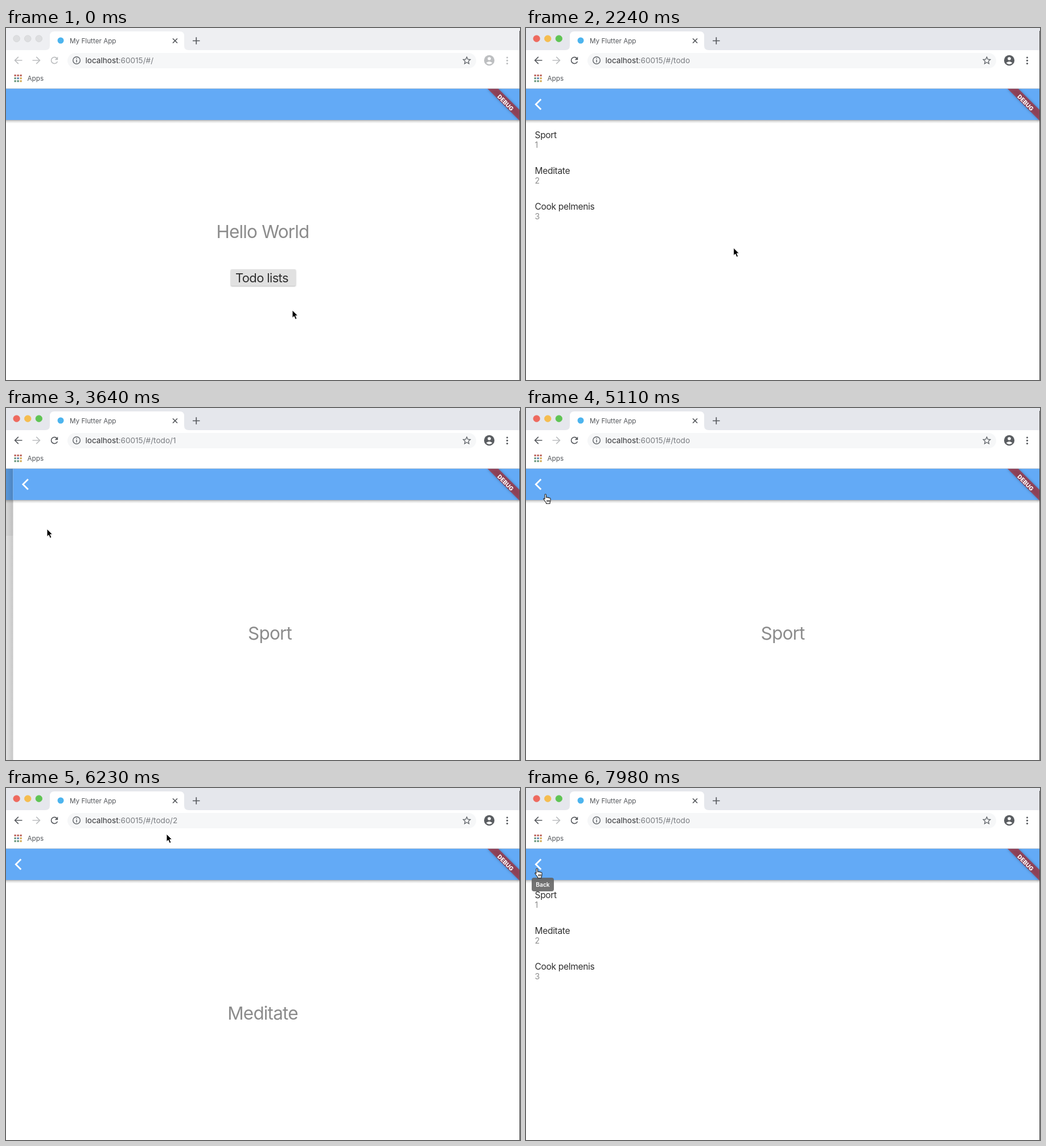
Write an HTML page that moves like this. It is 903 px wide and 620 px high and loops after 8 s.

```html
<!DOCTYPE html>
<html lang="en">
<head>
<meta charset="utf-8">
<title>My Flutter App</title>
<style>
  html, body { margin: 0; height: 100%; overflow: hidden; background: #fff; }
  svg { display: block; width: 100vw; height: 100vh; font-family: Inter, Roboto, sans-serif; }
  .icon { fill: none; stroke: currentColor; stroke-width: 1.7; }
  .headline { font-size: 31.5px; letter-spacing: -.85px; fill: #8c8c8c; text-anchor: middle; }
  .item { font-size: 15.5px; letter-spacing: -.3px; fill: #2e2e2e; }
  .sub { font-size: 14px; fill: #8c8c8c; }
  .chevron { fill: none; stroke: #fff; stroke-width: 2.8; }
  #banner { filter: drop-shadow(0 0 2.5px rgba(0, 0, 0, .45)); }
</style>
</head>
<body>
<svg viewBox="0 0 903 620">
  <defs>
    <linearGradient id="barShade" x2="0" y2="1">
      <stop offset="0" stop-opacity=".3"/>
      <stop offset=".4" stop-opacity=".13"/>
      <stop offset="1" stop-opacity="0"/>
    </linearGradient>
    <linearGradient id="edgeShade">
      <stop offset="0" stop-opacity="0"/>
      <stop offset=".3" stop-opacity=".016"/>
      <stop offset=".6" stop-opacity=".07"/>
      <stop offset="1" stop-opacity=".22"/>
    </linearGradient>
    <clipPath id="viewport"><path d="M0 107H903V620H0Z"/></clipPath>
    <g id="pageBase">
      <path d="M0 107H903V620H0Z" fill="#fff"/>
      <path d="M-45 107H0V620H-45Z" fill="url(#edgeShade)"/>
    </g>
    <g id="bar">
      <path d="M0 162H903V168H0Z" fill="url(#barShade)"/>
      <path d="M0 107H903V162H0Z" fill="#63aaf6"/>
    </g>
    <path id="chevron" class="chevron" d="M26.3 125.5L17.3 134.5L26.3 143.5"/>
  </defs>

  <path id="strip" d="M0 0H903V39H0Z"/>
  <g id="lights"></g>
  <path d="M69 39Q77 39 77 31V14Q77 6 85 6H305Q313 6 313 14V31Q313 39 321 39V106H0V39Z" fill="#fff"/>
  <path d="M0 39H903V106H0Z" fill="#fff"/>
  <path d="M0 106H903V107H0Z" fill="#d4d6d8"/>
  <circle cx="96" cy="22" r="5.5" fill="#4cb4ee"/>
  <text x="112" y="27" font-size="11.7" fill="#54575b">My Flutter App</text>
  <g color="#55585c">
    <path class="icon" stroke-width="1.5" d="M293 18.5L301 26.5M301 18.5L293 26.5"/>
    <path class="icon" d="M328 22.5H340.5M334.3 16.2V28.8"/>
  </g>

  <rect x="108" y="44" width="718" height="27" rx="13.5" fill="#f6f7f8"/>
  <path id="goBack" class="icon" d="M28.5 57H16M21.8 50.8L15.6 57L21.8 63.2"/>
  <path id="goForward" class="icon" d="M46.5 57H59M53.2 50.8L59.4 57L53.2 63.2"/>
  <g id="reload">
    <path class="icon" d="M89.2 53.2A5.6 5.6 0 1 0 90.3 59"/>
    <path d="M91.2 50.5V56.2H85.5Z" fill="currentColor"/>
  </g>
  <g color="#5f6368">
    <circle class="icon" cx="124" cy="57" r="6.3" style="stroke-width:1.4"/>
    <path class="icon" style="stroke-width:1.5" d="M124 56V60.6M124 53V54.6"/>
    <path class="icon" style="stroke-width:1.3" d="M809.5 51L811.3 55.1L815.7 55.5L812.4 58.4L813.4 62.8L809.5 60.5L805.6 62.8L806.6 58.4L803.3 55.5L807.7 55.1Z"/>
  </g>
  <text x="139.5" y="62" font-size="13.6" fill="#797c80"><tspan fill="#303134">localhost</tspan><tspan id="path"></tspan></text>
  <g id="menu" fill="currentColor">
    <circle cx="849" cy="57" r="9.2"/>
    <circle cx="849" cy="54" r="2.8" fill="#fff"/>
    <path d="M843.5 61.6Q849 56.2 854.5 61.6Q849 66.5 843.5 61.6Z" fill="#fff"/>
    <circle cx="880.5" cy="52" r="1.6"/><circle cx="880.5" cy="57.3" r="1.6"/><circle cx="880.5" cy="62.6" r="1.6"/>
  </g>
  <g id="apps"></g>
  <text x="37.5" y="92.5" font-size="11.7" fill="#54575b">Apps</text>

  <g clip-path="url(#viewport)">
    <g id="home">
      <use href="#pageBase"/><use href="#bar"/>
      <text class="headline" x="451" y="369.5">Hello World</text>
      <rect id="button" x="395" y="425" width="114" height="29" rx="2" fill="#e1e1e1"/>
      <text x="403" y="447.5" font-size="22" letter-spacing="-.65" fill="#2e2e2e">Todo lists</text>
    </g>
    <g id="list">
      <use href="#pageBase"/>
      <rect id="highlight" x="1" width="901" height="62" fill-opacity=".045"/>
      <g id="rows"></g>
      <use href="#bar"/><use href="#chevron"/>
    </g>
    <g id="detail">
      <use href="#pageBase"/><use href="#bar"/><use href="#chevron"/>
      <text id="detailTitle" class="headline" x="451" y="408"></text>
    </g>
    <g id="tooltip">
      <rect x="10" y="158" width="39" height="24" rx="4" fill="#616161" fill-opacity=".88"/>
      <text x="29.5" y="174" font-size="10.2" font-weight="600" fill="#fff" text-anchor="middle">Back</text>
    </g>
    <g id="banner">
      <path d="M846 107H865L903 145V164Z" fill="#b71c1c" fill-opacity=".62"/>
      <text transform="translate(877.5 131.5) rotate(45)" y="3.6" font-size="10.2" font-weight="800" fill="#fff" text-anchor="middle">DEBUG</text>
    </g>
  </g>
  <path d="M902 5H903V620H902Z" fill="#4c4c4c"/>

  <g id="cursor" stroke-linejoin="round">
    <path id="arrow" d="M0 0V13.6L3.1 10.8L5.4 16.2L8 15.1L5.7 9.8H9.8Z" stroke="#fff" stroke-width="1"/>
    <path id="hand" transform="translate(-4 0)" fill="#fff" stroke="#222" stroke-width="1.1"
      d="M3 2Q3 .7 4.2 .7T5.5 2V7Q5.6 5.9 6.8 6T8 7.2Q8.3 6.4 9.3 6.6T10.4 7.8Q11 7.2 12 7.6T13 9V12Q13 14 12 15.5V17.5H5.5V16Q3.5 13.5 2.5 12Q.5 9.5 .8 8.8Q1.6 7.8 3 9.5ZM7 11V14.5M9 11V14.5M11 11V14.5"/>
  </g>
</svg>
<script>
const LOOP = 8000, STEP = 70, WIDTH = 903;
const SLIDE = 300, SLIDE_DELAY = 20, ACTIVATE = 1300;
const TODOS = ['Sport', 'Meditate', 'Cook pelmenis'];
const ROW_TOP = 163, ROW_HEIGHT = 63;

// Navigation: time, depth reached (0 home, 1 list, 2 detail), todo shown.
const visits = [
  { at: -1000, depth: 0, todo: 1 },
  { at: 1800, depth: 1, todo: 1 },
  { at: 3385, depth: 2, todo: 1 },
  { at: 5090, depth: 1, todo: 1 },
  { at: 5890, depth: 2, todo: 2 },
  { at: 7600, depth: 1, todo: 2 },
];

// Pointer stops: time, x, y.
const stops = [
  [0, 503, 497], [910, 503, 497], [1400, 450, 438], [1960, 450, 438],
  [2870, 72, 213], [3710, 72, 213], [4900, 34, 151], [5230, 34, 151],
  [5670, 130, 262], [5900, 130, 262], [6230, 282, 81], [6450, 300, 84],
  [7300, 19, 141], [LOOP, 19, 141],
];

const $ = id => document.getElementById(id);
const clamp = v => Math.min(1, Math.max(0, v));
const mix = (a, b, k) => a + (b - a) * k;
const show = (id, on) => $(id).style.display = on ? '' : 'none';
const shift = (id, x, y = 0) => $(id).setAttribute('transform', `translate(${x} ${y})`);

function bezier(x1, y1, x2, y2) {
  const at = (a, b, s) => 3 * (1 - s) ** 2 * s * a + 3 * (1 - s) * s * s * b + s ** 3;
  return x => {
    if (x <= 0 || x >= 1) return clamp(x);
    let low = 0, high = 1;
    for (let i = 0; i < 24; i++) {
      const mid = (low + high) / 2;
      if (at(x1, x2, mid) < x) low = mid; else high = mid;
    }
    return at(y1, y2, low);
  };
}
const slideEase = bezier(.35, .91, .33, .97);

const lightColors = ['#ee6a5f', '#f5bd4f', '#5fc454'];
$('lights').innerHTML = lightColors.map((_, i) =>
  `<circle cx="${18.6 + 19.6 * i}" cy="18.7" r="5.8" stroke-width=".7"/>`).join('');

const [red, green, blue, yellow] = ['#bd625c', '#64947a', '#5f84ad', '#d3a955'];
$('apps').innerHTML = [red, red, red, green, blue, yellow, green, green, yellow].map((color, i) =>
  `<rect x="${14.5 + i % 3 * 5}" y="${82 + Math.floor(i / 3) * 5}" width="3.2" height="3.2" fill="${color}"/>`).join('');

$('rows').innerHTML = TODOS.map((name, i) => {
  const y = ROW_TOP + ROW_HEIGHT * i;
  return `<text class="item" x="15.5" y="${y + 31}">${name}</text><text class="sub" x="15.5" y="${y + 48}">${i + 1}</text>`;
}).join('');

function pointerAt(t) {
  const i = stops.findIndex(stop => stop[0] > t);
  const [a, b] = [stops[i - 1], stops[i]];
  const k = (t - a[0]) / (b[0] - a[0]);
  const eased = k * k * (3 - 2 * k);
  return [mix(a[1], b[1], eased), mix(a[2], b[2], eased)];
}

function drawChrome(active, depth, todo) {
  const on = '#5a5d61', off = '#bdbfc1';
  $('strip').setAttribute('fill', active ? '#e5e7ec' : '#eeeff2');
  [...$('lights').children].forEach((light, i) => {
    light.setAttribute('fill', active ? lightColors[i] : '#dddee0');
    light.setAttribute('stroke', active ? lightColors[i] : '#cfd0d2');
  });
  const tint = (id, enabled) => $(id).style.color = enabled ? on : off;
  tint('goBack', active && depth > 0);
  tint('goForward', active && depth === 0);
  tint('reload', active);
  tint('menu', active);
  $('path').textContent = ':60015/#/' + ['', 'todo', 'todo/' + todo][depth];
}

function draw(t) {
  const index = visits.findLastIndex(visit => visit.at <= t);
  const { at, depth, todo } = visits[index];
  const from = index ? visits[index - 1].depth : depth;
  const progress = clamp((t - at - SLIDE_DELAY) / SLIDE);
  const sliding = progress > 0 && progress < 1;
  const level = mix(from, depth, slideEase(progress));
  const listIn = clamp(level), detailIn = clamp(level - 1);
  const active = t >= ACTIVATE;

  drawChrome(active, depth, todo);
  shift('home', -WIDTH / 3 * listIn);
  shift('list', WIDTH * (1 - listIn) - WIDTH / 3 * detailIn);
  shift('detail', WIDTH * (1 - detailIn));
  show('home', listIn < 1);
  show('list', listIn > 0 && detailIn < 1);
  show('detail', detailIn > 0);
  $('detailTitle').textContent = TODOS[todo - 1];

  const [x, y] = pointerAt(t);
  const row = Math.floor((y - ROW_TOP) / ROW_HEIGHT);
  const onRow = listIn === 1 && row >= 0 && row < TODOS.length;
  const onButton = active && depth === 0 && x > 395 && x < 509 && y > 425 && y < 454;
  const onBack = depth > 0 && x < 56 && y > 107 && y < 162;
  const hand = !sliding && (onButton || onBack || (onRow && detailIn === 0));

  show('highlight', onRow);
  $('highlight').setAttribute('y', ROW_TOP + ROW_HEIGHT * row);
  $('button').style.filter = onButton
    ? 'drop-shadow(0 2px 2px rgba(0,0,0,.35))'
    : 'drop-shadow(0 1px 1px rgba(0,0,0,.3))';
  $('tooltip').style.opacity = clamp((t - 7850) / 110);
  show('hand', hand);
  show('arrow', !hand);
  shift('cursor', x, y);
}

function frame() {
  const t = performance.now() % LOOP;
  draw(Math.floor(t / STEP) * STEP);
  requestAnimationFrame(frame);
}
frame();
</script>
</body>
</html>
```
